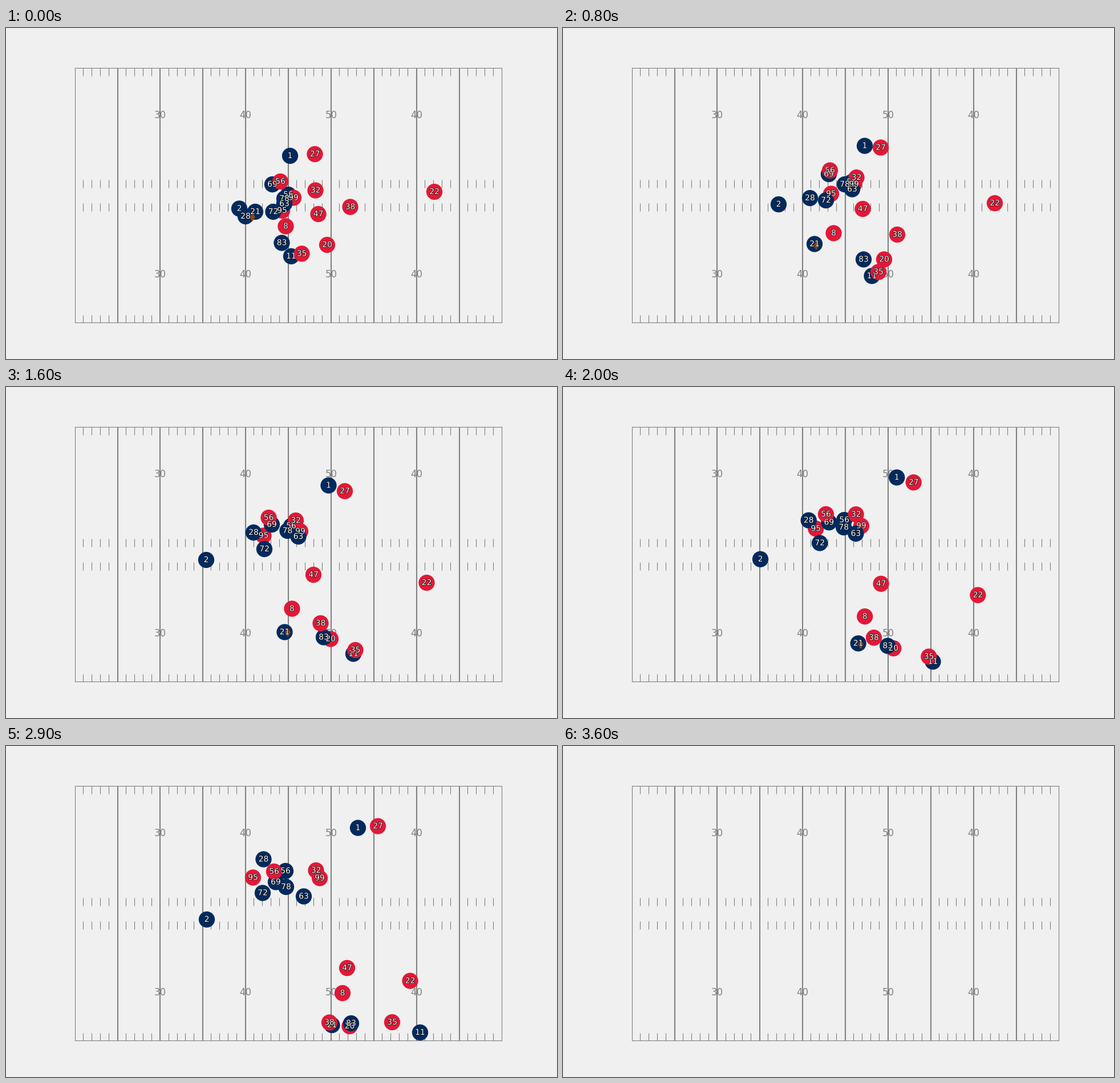
A matplotlib script that plays this animation: 966 px wide and 580 px high, repeating every 4 s.

```python
import numpy as np
import matplotlib.pyplot as plt
from matplotlib import patheffects
from matplotlib.animation import FuncAnimation

W, H, DPI = 966, 580, 100
FRAMES, INTERVAL = 40, 100
LAST = 35  # final step with players on the field

BG, GRAY = "#f0f0f0", "#808080"
NAVY, RED, BROWN = "#002a5e", "#e31837", "#8b4513"

LEFT, RIGHT, TOP, BOTTOM = 120.75, 869.4, 69.6, 516.2
YARD = (RIGHT - LEFT) / 50

# Waypoints (stage pixels) at these steps; rows are in stacking order.
STEPS = np.array([0, 8, 12, 16, 24, 29])

BACK = [
    (NAVY, 56, (495, 506, 506, 500, 488.5, 490), (292, 270, 258, 243.5, 225.5, 219)),
    (RED, 95, (484, 470, 461, 451.5, 437, 433), (320, 290.5, 275, 260.5, 238.5, 230.5)),
    (RED, 99, (504, 510, 512, 516, 533, 550), (297.5, 274, 263.5, 253, 236, 231.5)),
    (RED, 20, (563, 563, 564, 569, 591, 602.5), (380, 405.5, 423, 441.5, 473, 491)),
]
MIDDLE = [
    (NAVY, 2, (409, 378, 361.5, 351, 346, 352), (316.5, 309, 306, 303, 302, 304)),
    (NAVY, 28, (420, 433, 437, 434, 433, 451.5), (330, 298, 277, 255, 215, 198.5)),
    (NAVY, 21, (437, 441, 459.5, 488.5, 544.5, 571.5), (322, 378.5, 405.5, 429.5, 467, 489)),
    (NAVY, 1, (498, 529, 546, 565.5, 602.5, 617), (224, 206.5, 189, 172.5, 148.5, 143.5)),
    (NAVY, 69, (467, 466, 466, 466, 468, 473), (274, 256, 247, 241, 236, 238.5)),
    (NAVY, 78, (488, 494, 494, 493.5, 491, 491), (299, 274, 262.5, 252, 244, 247)),
    (NAVY, 63, (488, 507, 511.5, 512.5, 515.5, 522), (308, 282.5, 271, 262, 256.5, 263.5)),
    (NAVY, 72, (468.5, 461, 457.5, 453, 449, 450), (322, 302, 293, 284, 264, 257.5)),
    (NAVY, 83, (483.5, 527, 544.5, 557, 583, 605), (376.5, 405.5, 422, 438.5, 468, 486)),
    (NAVY, 11, (500, 541.5, 572.5, 609, 686.5, 726), (400, 434.5, 452, 467.5, 492.5, 502)),
]
FRONT = [
    (RED, 27, (541.5, 557, 573.5, 594, 633.5, 652), (221, 209.5, 198, 182.5, 153.5, 140.5)),
    (RED, 56, (481, 468, 463.5, 460.5, 464, 470), (269, 249.5, 238.5, 229, 220, 220)),
    (RED, 32, (542.5, 514.5, 509, 508, 524.5, 543.5), (284.5, 262, 247.5, 234, 217, 218)),
    (RED, 22, (751, 757, 749.5, 737.5, 718.5, 708.5), (287, 307, 323.5, 343, 386.5, 411.5)),
    (RED, 38, (603.5, 586, 568, 551.5, 548.5, 567), (313.5, 362, 388, 414, 462, 484.5)),
    (RED, 47, (547.5, 525.5, 526.5, 539, 577.5, 598), (326, 317, 319.5, 329, 364, 389)),
    (RED, 8, (490.5, 474.5, 481, 501.5, 558.5, 590), (347.5, 359.5, 374, 388.5, 415.5, 433)),
    (RED, 35, (518.5, 553, 580.5, 612.5, 663.5, 677), (395.5, 427.5, 445.5, 461, 480, 484)),
]
BALL = ((432.5, 444, 463, 494, 547, 570.5), (331, 381, 406, 430, 469.5, 488))

PLAYERS = BACK + MIDDLE + FRONT
PATHS = np.array([(xs, ys) for _, _, xs, ys in PLAYERS] + [BALL], dtype=float)
SPEEDS = np.gradient(PATHS, STEPS, axis=2, edge_order=2)


def positions(step):
    """Cubic Hermite through the waypoints, then coasting to a stop."""
    if step >= STEPS[-1]:
        decay = 0.82
        coast = (1 - decay ** (step - STEPS[-1])) / (1 - decay)
        return PATHS[:, :, -1] + SPEEDS[:, :, -1] * coast
    k = np.searchsorted(STEPS, step, side="right") - 1
    span = STEPS[k + 1] - STEPS[k]
    u = (step - STEPS[k]) / span
    ease = u * u * (3 - 2 * u)
    return (PATHS[:, :, k] * (1 - ease) + PATHS[:, :, k + 1] * ease
            + span * u * (1 - u) * (SPEEDS[:, :, k] * (1 - u) - SPEEDS[:, :, k + 1] * u))


def draw_field(ax):
    for spine in ax.spines.values():
        spine.set(color=GRAY, linewidth=0.8)
    for yard in range(5, 50, 5):
        ax.axvline(LEFT + yard * YARD, color=GRAY, lw=1.5, zorder=2)
    marks = [LEFT + n * YARD - 0.9 for n in range(1, 50) if n % 5]
    for y0, y1 in ((70, 83.5), (266, 279.5), (307, 320.5), (503, 516)):
        ax.vlines(marks, y0, y1, color=GRAY, lw=0.8, zorder=2)
    for yard, label in ((10, "30"), (20, "40"), (30, "50"), (40, "40")):
        for y in (TOP + 83.8, BOTTOM - 83.8):
            ax.text(LEFT + yard * YARD, y, label, color=GRAY, fontsize=12,
                    ha="center", va="center", zorder=3)


plt.rcParams["font.family"] = "DejaVu Sans"
fig = plt.figure(figsize=(W / DPI, H / DPI), dpi=DPI, facecolor=BG)
ax = fig.add_axes((LEFT / W, 1 - BOTTOM / H, (RIGHT - LEFT) / W, (BOTTOM - TOP) / H),
                  facecolor=BG)
ax.set(xlim=(LEFT, RIGHT), ylim=(BOTTOM, TOP), xticks=[], yticks=[])
draw_field(ax)

start = positions(0)
discs = ax.scatter(start[:-1, 0], start[:-1, 1], s=415, linewidths=0,
                   c=[p[0] for p in PLAYERS], zorder=4)
ball, = ax.plot([], [], marker="d", ms=8, mew=0, color=BROWN, zorder=5)
outline = [patheffects.withStroke(linewidth=1, foreground="black")]
numbers = [ax.text(0, 0, str(p[1]), color="white", fontsize=10, ha="center",
                   va="center", path_effects=outline, zorder=6) for p in PLAYERS]
actors = [discs, ball, *numbers]


def update(step):
    for actor in actors:
        actor.set_visible(step <= LAST)
    pos = positions(min(step, LAST))
    discs.set_offsets(pos[:-1])
    ball.set_data(pos[-1:, 0], pos[-1:, 1])
    for text, xy in zip(numbers, pos):
        text.set_position(xy)
    return actors


anim = FuncAnimation(fig, update, frames=FRAMES, interval=INTERVAL,
                     repeat=True, repeat_delay=0, blit=False)
plt.show()
```
